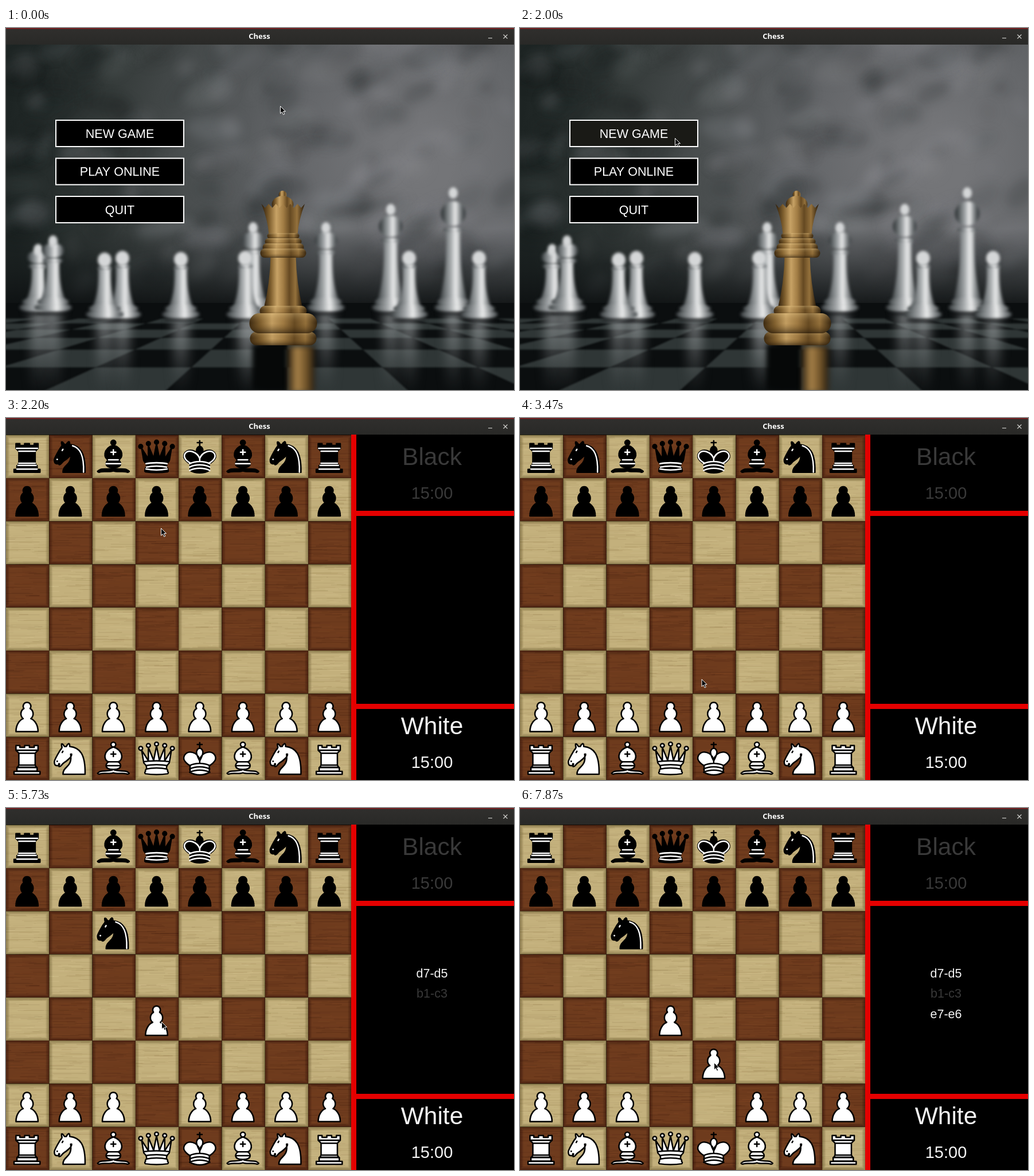
An HTML page with a canvas that plays this animation: 886x632 px, repeating every 8000 ms.

```html
<!DOCTYPE html>
<html>
<head>
<meta charset="utf-8">
<title>Chess</title>
<style>
html, body { margin: 0; overflow: hidden; background: #000; }
canvas { display: block; }
</style>
</head>
<body>
<canvas id="stage" width="886" height="632"></canvas>
<script>
const W = 886, H = 632, LOOP = 8000;
const CELL = 75.3, BOARD_Y = 29.6;
const ctx = document.getElementById('stage').getContext('2d');

let seed = 7;
const rnd = (a = 0, b = 1) => {
  seed = (seed * 16807) % 2147483647;
  return a + (b - a) * seed / 2147483647;
};

function layer(draw) {
  const c = document.createElement('canvas');
  c.width = W;
  c.height = H;
  draw(c.getContext('2d'));
  return c;
}

function stops(grad, colors) {
  colors.forEach((c, i) => grad.addColorStop(i / (colors.length - 1), c));
  return grad;
}
const across = (g, x, w, ...colors) => stops(g.createLinearGradient(x - w, 0, x + w, 0), colors);
const down = (g, y0, y1, ...colors) => stops(g.createLinearGradient(0, y0, 0, y1), colors);

function rect(g, fill, x, y, w, h) {
  g.fillStyle = fill;
  g.fillRect(x, y, w, h);
}

function oval(g, fill, x, y, rx, ry = rx, turn = 0) {
  g.fillStyle = fill;
  g.beginPath();
  g.ellipse(x, y, rx, ry, turn, 0, 7);
  g.fill();
}

function text(s, x, y, size, color = '#fff', font = '"Liberation Sans", Arial, sans-serif', weight = '') {
  ctx.font = `${weight} ${size}px ${font}`;
  ctx.textAlign = 'center';
  ctx.fillStyle = color;
  ctx.fillText(s, x, y);
}

// ---- Menu backdrop ----

function drawWall(g) {
  const glow = g.createRadialGradient(720, 230, 60, 720, 230, 720);
  rect(g, stops(glow, ['#747578', '#646669', '#4c5051', '#343a39', '#1d2423']), 0, 0, W, H);
  g.filter = 'blur(9px)';
  for (let i = 0; i < 220; i++) {
    const tone = i % 2 ? '160,162,167' : '14,20,20';
    oval(g, `rgba(${tone},${rnd(.04, .2)})`, rnd(0, W), rnd(20, 460), rnd(10, 50), rnd(8, 24), rnd(-.9, .2));
  }
  g.filter = 'none';
  rect(g, down(g, 350, 490, 'rgba(18,22,23,0)', 'rgba(18,22,23,.45)', 'rgba(12,15,16,.95)'), 0, 350, W, 140);
}

function drawFloor(g) {
  rect(g, '#0b0e0f', 0, 480, W, H);
  const depth = k => 1 / (.0168 - .0017 * k);
  g.filter = 'blur(1.5px)';
  for (let k = 1; k < 7; k++) {
    for (let i = -8 + k % 2; i < 8; i += 2) {
      const near = depth(k + 1), far = depth(k);
      g.beginPath();
      for (const [n, d] of [[i, far], [i + 1, far], [i + 1, near], [i, near]]) g.lineTo(490 + n * d * 1.1, 441 + d);
      g.fillStyle = '#2f3636';
      g.fill();
    }
  }
  g.filter = 'none';
}

// Top of each piece; the low ones are pawns.
const SILVER = [[56, 373], [82, 358], [203, 388], [172, 391], [305, 390], [431, 335], [417, 388],
  [558, 335], [671, 303], [703, 388], [780, 274], [825, 388]];

function drawSilver(g) {
  for (const [x, top] of SILVER) {
    const tall = top < 385, base = tall ? 492 : 504, h = base - top, neck = top + (tall ? h * .36 : 28);
    const metal = w => across(g, x, w, '#34393b', '#6d7274', '#a2a6a8', '#eceded', '#8b8f91', '#3c4143');
    g.filter = 'blur(9px)';
    rect(g, down(g, base, H, 'rgba(200,204,206,.6)', 'rgba(170,174,176,.3)', 'rgba(90,94,96,.05)'), x - 13, base, 26, H - base);
    g.filter = 'blur(2.5px)';
    g.beginPath();
    for (let side = -1; side < 2; side += 2) {
      for (let n = 0; n <= 10; n++) {
        const u = (side < 0 ? n : 10 - n) / 10;
        g.lineTo(x + side * (9 + h * .015 + 14 * u ** 3), neck + (base - 10 - neck) * u);
      }
    }
    g.fillStyle = metal(24);
    g.fill();
    if (tall) {
      oval(g, metal(19), x, top + h * .23, 15 + h * .03, h * .1);
      oval(g, metal(18), x, neck, 17, 5);
    } else {
      oval(g, metal(14), x, neck, 13, 4);
    }
    oval(g, metal(30), x, base - 14, 28, 7);
    oval(g, metal(34), x, base - 4, 33, 9);
    oval(g, '#d5d7d8', x, top + 14, tall ? 8 : 12, tall ? 10 : 13);
    oval(g, 'rgba(15,18,19,.6)', x, base + 6, 30, 3);
  }
  g.filter = 'none';
}

function drawGoldQueen(g) {
  const x = 483.5;
  const gold = w => across(g, x, w, '#38260f', '#80602f', '#c7a265', '#a27d45', '#654922', '#94713c', '#33230e');
  const ring = (y, h, w) => {
    for (const fill of [gold(w), down(g, y, y + h, 'rgba(255,225,160,.3)', 'rgba(120,85,35,.05)', 'rgba(25,15,4,.6)')]) {
      g.fillStyle = fill;
      g.beginPath();
      g.roundRect(x - w, y, 2 * w, h, h / 2);
      g.fill();
    }
  };
  g.filter = 'blur(4px)';
  rect(g, '#060808', 430, 552, 60, 80);
  rect(g, across(g, 516, 26, '#2a1d0d', '#a8834a', '#6d5027', '#15110b'), 492, 556, 46, 80);
  g.filter = 'none';

  oval(g, gold(8), x - 1, 291, 7);
  oval(g, gold(20), x - 1, 308, 19, 15);
  g.beginPath();
  for (let i = 0; i <= 12; i++) g.lineTo(x - 38 + i * 6.3, i % 2 ? 314 : 307);
  g.quadraticCurveTo(x + 27, 335, x + 25, 360);
  g.lineTo(x - 25, 360);
  g.quadraticCurveTo(x - 27, 335, x - 38, 307);
  g.fillStyle = gold(36);
  g.fill();
  g.beginPath();
  g.moveTo(x - 22, 398);
  g.quadraticCurveTo(x - 23, 445, x - 34, 490);
  g.lineTo(x + 34, 490);
  g.quadraticCurveTo(x + 23, 445, x + 22, 398);
  g.fillStyle = gold(32);
  g.fill();
  for (let i = 0; i < 4; i++) ring(358 + i * 9, 10 + i * 2, 28 + i * 4);
  ring(485, 18, 41);
  ring(530, 24, 58);
  ring(498, 35, 59);
}

const backdrop = layer(g => {
  drawWall(g);
  drawFloor(g);
  drawSilver(g);
  drawGoldQueen(g);
});

// ---- Board ----

const board = layer(g => {
  for (let i = 0; i < 64; i++) {
    const col = i % 8, row = i >> 3, light = (col + row) % 2 === 0;
    const x = col * CELL, y = BOARD_Y + row * CELL;
    g.save();
    g.beginPath();
    g.rect(x, y, CELL, CELL);
    g.clip();
    rect(g, light ? '#c3b07c' : '#6e3b1d', x, y, CELL, CELL);
    for (let n = 0; n < 90; n++) {
      const tone = n % 2 ? (light ? '120,95,50' : '45,18,6') : (light ? '225,210,160' : '145,84,46');
      rect(g, `rgba(${tone},${rnd(.04, .16)})`, x + rnd(-30, 60), y + rnd(0, CELL), rnd(15, 70), rnd(.6, 1.8));
    }
    g.strokeStyle = light ? 'rgba(70,52,18,.08)' : 'rgba(35,12,2,.08)';
    for (let w = 2; w < 14; w += 2) {
      g.lineWidth = w;
      g.strokeRect(x, y, CELL, CELL);
    }
    g.restore();
  }
});

// Outline, inner lines, extra lines when black. Only the right half is given, except for the knight.
const PIECES = {
  p: ['M0 9a4 4 0 0 1 3.2 6.4A6.5 6.5 0 0 1 4 26c3 1 7.5 5.5 7.5 13.5H0'],
  r: ['M0 39h13.5v-3H0M0 36h10.5v-4H0M0 32h10l-1.5-2.5V17l3-3V9h-4v2h-5V9H0',
    'M0 35.7h10.5M0 31.7h9.5M0 29.5h8.5M0 17h8.5M0 14h11'],
  n: ['M-.5 10c10.5 1 16.5 8 16 29h-23c0-9 10-6.5 8-21M1.5 18c.4 3-5.5 7.4-8 9-3 2-2.8 4.3-5 4-1-1 1.4-3 0-3-1 0 .2 1.2-1 2-1 0-4 1-4-4 0-2 6-12 6-12q2-2 2-3.5-.7-1-.5-3c1-1 3 2.5 3 2.5h2q.8-2 2.5-3c1 0 1 3 1 3',
    'M-13.7 25.5h.3M-8.3 16.2l.7-1.2', 'M2.5 11.3c8 2.2 12 10.2 11.4 27.5'],
  b: ['M0 34c3.4 2.4 10 1 13.5 2q1.6.5 3 2-1 1.4-3 .5c-3.4-1-10 .5-13.5-1M0 34c4 0 7.5-1 7.5-4q0-2.5-2.5-4c5.5-1.5 6-11.5-5-15.5M0 5.5a2.5 2.5 0 0 1 0 5',
    'M0 26h5M0 30h7.5M0 15.5v5M0 18h2.5'],
  q: ['M0 25q9 0 13.5 1c0 2-1.5 2-2.5 4-.8 1.5-.8 1-.5 3.5q1.5 1 1 2.5 1.5 1.5 0 2.5-5 .8-11.5.8M0 25q9 0 13.5 1l2-12-7 11V11L3 24.5 0 9.5M0 5.5a2 2 0 0 1 0 4M8.5 7a2 2 0 0 1 0 4 2 2 0 0 1 0-4M16.5 10a2 2 0 0 1 0 4 2 2 0 0 1 0-4',
    'M0 29q7 0 11 1M0 32.5q6 0 10.5 1', 'M0 36.5q6 0 11-1'],
  k: ['M0 6v6M0 8h2.5M0 12q2 0 3 2.5c1.5 3-3 10.5-3 10.5M0 39.6q6 0 10-2.6v-7s9-4.5 6-10.5c-4-6.5-13.5-3.5-16 4',
    'M0 24v3M0 27.7q6 0 10.5 2.3M0 31.2q6 0 10.5 2.3M0 34.7q6 0 10.5 2.3', 'M9.5 29.5s8.5-4 6-9.7C11.7 14 2.5 18 0 24.5']
};
for (const kind in PIECES) {
  PIECES[kind] = PIECES[kind].map(d => {
    const path = new Path2D(d);
    if (kind !== 'n') path.addPath(new Path2D(d), new DOMMatrix([-1, 0, 0, 1, 0, 0]));
    return path;
  });
}

const BACK_RANK = 'rnbqkbnr';
const MOVES = [[5270, 'd7-d5'], [5730, 'b1-c3'], [7670, 'e7-e6']];
const SELECTIONS = [[4270, 5270, 'd7'], [6530, 7670, 'e7']];
const square = name => [name.charCodeAt(0) - 97, name[1] - 1];

function drawPiece(kind, black, col, row) {
  const [body, lines, blackLines] = PIECES[kind];
  ctx.save();
  ctx.translate((col + .5) * CELL - 1, BOARD_Y + row * CELL);
  ctx.scale(CELL / 45, CELL / 45);
  ctx.lineWidth = 1.5;
  ctx.lineCap = ctx.lineJoin = 'round';
  ctx.fillStyle = black ? '#000' : '#fff';
  ctx.strokeStyle = '#000';
  ctx.fill(body);
  ctx.stroke(body);
  if (black) ctx.strokeStyle = '#fff';
  if (lines) ctx.stroke(lines);
  if (black && blackLines) ctx.stroke(blackLines);
  ctx.restore();
}

function drawGame(t) {
  rect(ctx, '#000', 0, 29, W, H);
  ctx.drawImage(board, 0, 0);
  for (const [from, to, name] of SELECTIONS) {
    const [col, row] = square(name);
    if (t >= from && t < to) rect(ctx, '#f9d66d', col * CELL - .6, BOARD_Y + row * CELL, CELL, CELL);
  }

  const played = MOVES.filter(m => t >= m[0]).map(m => m[1]);
  for (const start of [0, 1, 6, 7]) {
    for (let file = 0; file < 8; file++) {
      let col = file, row = start;
      for (const move of played) {
        const [from, to] = move.split('-').map(square);
        if (from[0] === col && from[1] === row) [col, row] = to;
      }
      drawPiece(start % 7 ? 'p' : BACK_RANK[file], start < 4, col, row);
    }
  }

  const red = '#e50000', dim = '#393939', bright = '#f4f4f4';
  rect(ctx, red, 602, 29, 9, H);
  rect(ctx, red, 602, 162, W, 9);
  rect(ctx, red, 602, 499, W, 9);
  [['Black', 82, dim], ['White', 552, bright]].forEach(([name, y, color]) => {
    text(name, 743, y, 42.5, color);
    text('15:00', 743, y + 59, 29, color);
  });
  played.forEach((move, i) => text(move, 743, 295.5 + i * 35.6, 21.5, i % 2 ? dim : bright));
}

function drawMenu(x, y) {
  ctx.drawImage(backdrop, 0, 0);
  ['NEW GAME', 'PLAY ONLINE', 'QUIT'].forEach((label, i) => {
    const top = 160 + i * 66.5;
    const hover = x > 86 && x < 311 && y > top && y < top + 48;
    rect(ctx, '#fff', 86, top, 225, 48);
    rect(ctx, hover ? '#1a1a16' : '#000', 88, top + 2, 221, 44);
    text(label, 198.5, top + 31.8, 21.5);
  });
}

function drawTitleBar() {
  rect(ctx, down(ctx, 0, 29, '#302f2d', '#292927'), 0, 0, W, 29);
  rect(ctx, '#7d1c1e', 0, 0, W, 1.6);
  text('Chess', 442, 19.3, 13, '#fff', '"Open Sans", sans-serif', 'bold');
  rect(ctx, '#c8c8c4', 841, 17, 7, 1.2);
  ctx.strokeStyle = '#d0d0cc';
  ctx.lineWidth = 1.2;
  ctx.stroke(new Path2D('M867.5 11.5l7 7m0-7l-7 7'));
}

// ---- Pointer ----

// Start, end, and where the pointer comes to rest.
const GLIDES = [
  [940, 1800, 270, 192], [2800, 3670, 324, 498], [3800, 4070, 260, 520], [4600, 4666, 269, 444],
  [4666, 5130, 271, 373], [6000, 6330, 352, 517], [6600, 7000, 336, 521], [7130, 7470, 338, 444]
];
const ARROW = new Path2D('M.5 .5V13.2L3.4 10.5 5.6 15.2 7.8 14.2 5.6 9.6H9.5z');

// The pointer is sampled at 15 steps per second.
function pointerAt(t) {
  const step = Math.floor((t + 5) * .015) / .015;
  let x = 478, y = 136;
  for (const [start, end, toX, toY] of GLIDES) {
    const u = Math.min(1, Math.max(0, (step - start) / (end - start)));
    const ease = u * u * (3 - 2 * u);
    x += (toX - x) * ease;
    y += (toY - y) * ease;
  }
  return [x, y];
}

function drawPointer(x, y) {
  ctx.save();
  ctx.translate(x, y);
  ctx.fillStyle = '#000';
  ctx.strokeStyle = '#fff';
  ctx.lineWidth = 1;
  ctx.fill(ARROW);
  ctx.stroke(ARROW);
  ctx.restore();
}

function frame() {
  const t = performance.now() % LOOP;
  const [x, y] = pointerAt(t);
  if (t < 2130) drawMenu(x, y);
  else if (t < 2200) {
    rect(ctx, '#000', 0, 0, W, H);
    text('Finding Player...', 442.5, 324, 35);
  } else drawGame(t);
  drawTitleBar();
  drawPointer(x, y);
  requestAnimationFrame(frame);
}
frame();
</script>
</body>
</html>
```
